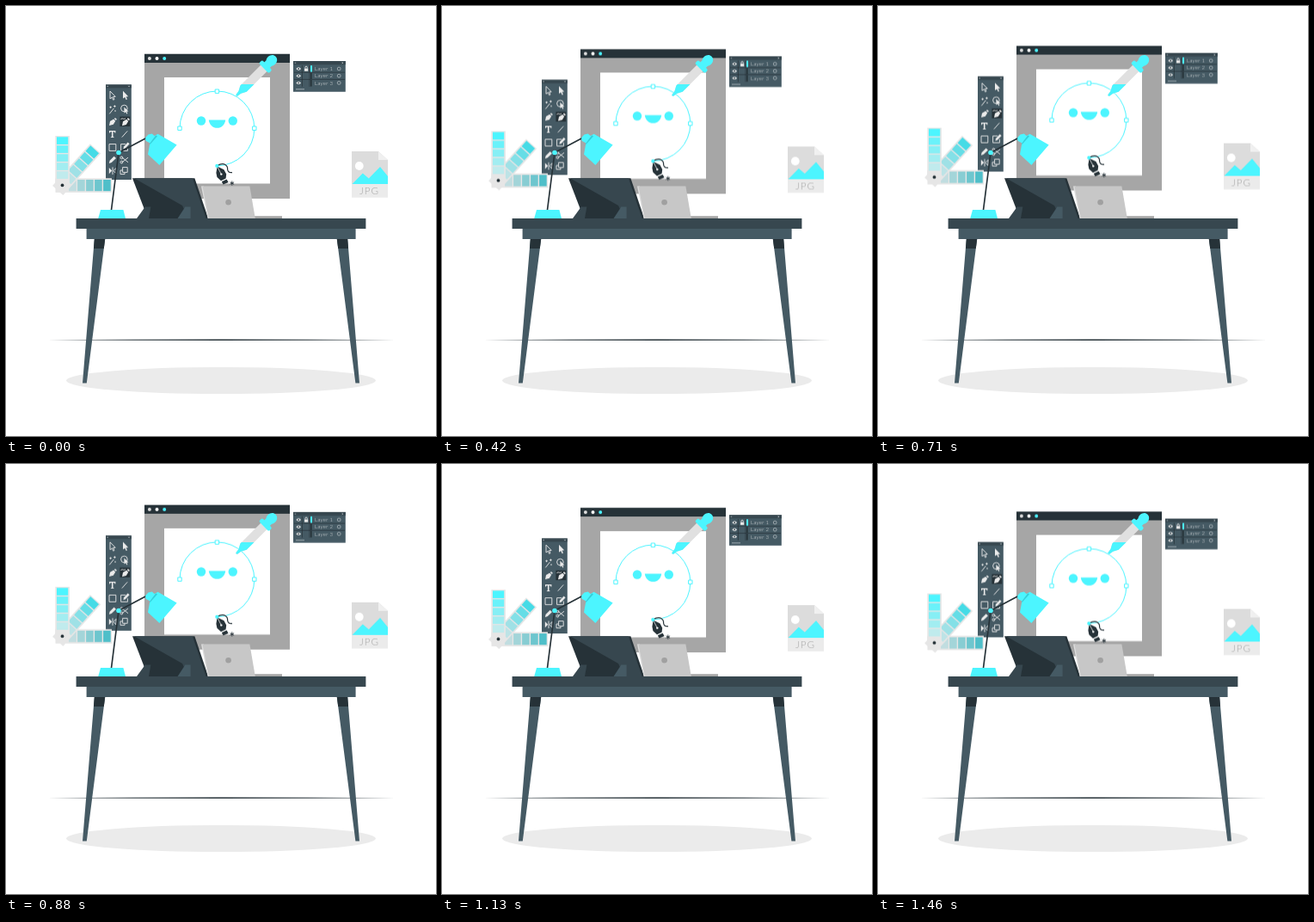
Recreate the animation shown at these times as an HTML page. Size 500 by 500 pixels, loop 1.5 s.

```html
<!DOCTYPE html>
<html lang="en">
<head>
<meta charset="utf-8">
<title>Design desk</title>
<style>
  html, body { margin: 0; width: 100%; height: 100%; overflow: hidden; background: #fff; }
  svg { display: block; width: 100vw; height: 100vh; }
  .float { animation: float 1.5s linear infinite; }
  @keyframes float { 50% { transform: translateY(-10px); } }
  .cyan { fill: #4cf5ff; }
  .night { fill: #263238; }
  .slate { fill: #37474f; }
  .steel { fill: #455a64; }
  .pale { fill: #ebebeb; }
  .line { fill: none; stroke: #ebebeb; stroke-width: .9; }
  text { font-family: Lato, "Open Sans", sans-serif; font-weight: 300; }
</style>
</head>
<body>
<svg viewBox="0 0 500 500">
  <defs>
    <g id="card">
      <rect x="57.3" y="151" width="16.6" height="65.5" fill="#e6e6e6"/>
      <g fill="currentColor">
        <rect x="59" y="152.3" width="13.2" height="8.6"/>
        <rect x="59" y="162.3" width="13.2" height="8.6" opacity=".8"/>
        <rect x="59" y="172.3" width="13.2" height="8.6" opacity=".62"/>
        <rect x="59" y="182.3" width="13.2" height="8.6" opacity=".44"/>
        <rect x="59" y="192.3" width="13.2" height="8.6" opacity=".25"/>
      </g>
    </g>
    <path id="nib" d="M-4 4.5 L-3-.5 1.2-3 3.2-.9 .8 3.2Z M1.8-3.6 3-4.7 4.9-2.8 3.8-1.6Z"/>
    <path id="arrow" d="M0 0 6.2 6.4 3.6 6.6 5 9.6 3.6 10.2 2.3 7.2 0 8.8Z"/>
    <g id="eye">
      <path class="pale" d="M-2.8 0 Q0-3.4 2.8 0 Q0 3.4-2.8 0Z"/>
      <circle class="slate" r=".9"/>
    </g>
    <clipPath id="liquid"><path d="M260 91H300V110H260Z"/></clipPath>
    <path id="tube" transform="translate(267.6 104.6) rotate(45)" d="M-1.2-1 Q0 .8 1.2-1 L2-6 5.2-12 V-47 H-5.2 V-12 L-2-6Z"/>
  </defs>

  <ellipse cx="250" cy="435.5" rx="180" ry="15.6" fill="#ebebeb"/>
  <path class="night" d="M49 388.2 Q250 386.8 452 388.2 Q250 389.6 49 388.2Z"/>

  <g class="float">
    <!-- window -->
    <path fill="#a6a6a6" d="M161 56H330V224H161Z"/>
    <path class="night" d="M161 55.8H330V66H161Z"/>
    <circle cx="166.9" cy="60.9" r="2" fill="#e0e0e0"/>
    <circle cx="175.5" cy="60.9" r="2" fill="#fff"/>
    <circle class="cyan" cx="184.2" cy="60.9" r="2"/>
    <path fill="#fff" d="M184 83H307V206.5H184Z"/>

    <!-- face -->
    <g class="cyan">
      <circle cx="227" cy="133.5" r="5.2"/>
      <circle cx="263.8" cy="133.5" r="5.2"/>
      <path d="M235.8 132.4H255.2C254.6 138 250.4 141.8 245.5 141.8S236.4 138 235.8 132.4Z"/>
    </g>
    <g fill="none" stroke="#4cf5ff">
      <path d="M202 142.2 A43.4 43.4 0 1 1 245.4 185.8"/>
      <g fill="#fff">
        <path d="M243.2 97H247.6V101.4H243.2Z"/>
        <path d="M199.8 140H204.2V144.4H199.8Z"/>
        <path d="M286.6 140H291V144.4H286.6Z"/>
      </g>
    </g>

    <!-- pen cursor -->
    <path fill="none" stroke="#263238" stroke-width="1.2" d="M245.4 185.8C254 180.5 258 186 257.6 190 C258 193 260 194 263 193.6"/>
    <path class="night" d="M245.6 186.5 253.4 190.2 256.2 195.5 255.6 200.6 250 203.2 245.4 199 244.4 194Z M250.8 204.2 256.6 201.4 258.6 205 252.6 207.6Z"/>
    <path stroke="#fff" stroke-width=".7" d="M246.4 188 250 195"/>
    <circle cx="250.3" cy="195.6" r="1.2" fill="#fff"/>
    <circle class="cyan" cx="245.3" cy="185.9" r="2.1"/>
    <path stroke="#263238" stroke-width=".9" d="M262.8 203.5V208.7 M260.5 204.8 265.1 207.4 M260.5 207.4 265.1 204.8"/>

    <!-- layers panel -->
    <path class="steel" d="M334 64H394.8V99.8H334Z"/>
    <path class="slate" d="M334 64H394.8V68.3H334Z"/>
    <path stroke="#c7d0d4" stroke-width=".7" d="M335.6 66.2H337.2 M390.6 65.5 392 66.9 M392 65.5 390.6 66.9 M337 96.8H347"/>
    <path stroke="#263238" stroke-width=".7" d="M335 77.2H394 M335 85.4H394 M344.4 69V93.8 M353 69V93.8"/>
    <path class="cyan" d="M354 69.2H356V76.6H354Z"/>
    <path class="night" d="M354 77.8H355.6V85H354Z M354 86H355.6V93.4H354Z"/>
    <use href="#eye" x="340.2" y="73"/>
    <use href="#eye" x="340.2" y="81.2"/>
    <use href="#eye" x="340.2" y="89.4"/>
    <path class="pale" d="M347 72.6H351.2V75.8H347Z"/>
    <path class="line" stroke-width=".7" d="M347.9 72.6V71.4A1.2 1.2 0 0 1 350.3 71.4V72.6"/>
    <g fill="#ebebeb" font-size="6.1" letter-spacing=".3">
      <text x="359" y="75.2">Layer 1</text>
      <text x="359" y="83.4">Layer 2</text>
      <text x="359" y="91.6">Layer 3</text>
    </g>
    <g fill="none" stroke="#d5dadd" stroke-width=".6">
      <circle cx="387.2" cy="73" r="1.9"/>
      <circle cx="387.2" cy="81.2" r="1.9"/>
      <circle cx="387.2" cy="89.4" r="1.9"/>
    </g>

    <!-- toolbar -->
    <path class="steel" d="M116 91.4H145.8V202H116Z"/>
    <path class="slate" d="M116 91.4H145.8V95.4H116Z"/>
    <path stroke="#c7d0d4" stroke-width=".7" d="M117.4 93.4H119 M142.4 92.8 143.6 94 M143.6 92.8 142.4 94"/>
    <path class="night" d="M132.4 128.6H144.2V140H132.4Z"/>
    <use href="#arrow" class="line" x="121" y="99"/>
    <use href="#arrow" class="pale" x="136" y="98.8"/>
    <path class="line" d="M120.3 125.4 125.4 119 M121.6 116.5V119 M120.4 117.7H122.8 M126.4 115.3V117.9 M125.1 116.6H127.7 M127 121V123"/>
    <circle class="line" cx="137.4" cy="119" r="3.8"/>
    <use href="#arrow" class="pale" transform="translate(137.4 117.4) scale(.8)"/>
    <use href="#nib" class="pale" x="124" y="134.6"/>
    <use href="#nib" class="pale" x="139" y="134.8"/>
    <path class="line" d="M133.6 132C135 129 137 133 139 130.4"/>
    <path class="pale" d="M120 145H127.4V147.4H126.4L126 146.2H124.5V152L125.6 152.4V153H121.8V152.4L122.9 152V146.2H121.4L121 147.4H120Z"/>
    <path class="line" d="M134.8 152.6 141.2 145.4"/>
    <path class="line" d="M120 160.6H127.8V168.4H120Z M139 160.6H133.6V168.4H141.4V164.4"/>
    <path class="pale" d="M136.4 166.2 137 163.4 141.6 158.4 143.6 160.2 139 165.2Z"/>
    <path class="pale" d="M119.8 183 120.6 179.8 125.6 174.8 128 177 122.8 182Z"/>
    <path class="line" d="M134.6 175.8 142 181.8 M134.6 182 142 176.2"/>
    <circle class="line" cx="134.4" cy="176.4" r="1.4"/>
    <circle class="line" cx="134.4" cy="181.6" r="1.4"/>
    <path class="pale" d="M119.8 188V195.2L123.2 191.6Z"/>
    <path class="line" d="M124 187.4V196 M128 188.4V195L125 191.6Z"/>
    <path class="line" d="M135.6 187.6H141.2V193.4H135.6Z M135.4 191H133V195.6H138V193.6"/>

    <!-- swatches -->
    <use href="#card" color="#4fbfc9" transform="rotate(90 65.5 208.5)"/>
    <use href="#card" color="#45dbe6" transform="rotate(42 65.5 208.5)"/>
    <svg x="0" y="0" width="500" height="210" viewBox="0 0 500 210"><use href="#card" color="#4cf5ff"/></svg>
    <circle class="night" cx="65.5" cy="208.4" r="1.9"/>

    <!-- image file -->
    <path fill="#dcdcdc" d="M402 169H433L444 179V207H402Z"/>
    <path fill="#f0f0f0" d="M433 169 444 179H433Z"/>
    <circle cx="410.8" cy="186" r="4.9" fill="#fff"/>
    <path class="cyan" d="M402.6 207 414.8 194.4 421.8 200.4 435 187 444 198V207Z"/>
    <path class="pale" d="M402 207H444V222.8H402Z"/>
    <text x="411" y="219" font-size="11.6" letter-spacing="1" fill="#a6a6a6">JPG</text>
  </g>

  <!-- eyedropper -->
  <use href="#tube" fill="#e0e0e0"/>
  <g clip-path="url(#liquid)"><use href="#tube" class="cyan"/></g>
  <g class="cyan" transform="translate(267.6 104.6) rotate(45)">
    <rect x="-8.2" y="-51" width="16.4" height="5.6" rx="2"/>
    <path d="M-4.6-50V-54C-7.5-58-5.5-65 0-65S7.5-58 4.6-54V-50Z"/>
  </g>

  <!-- tablet -->
  <path class="night" d="M147 200.2H219.4L235.2 247H165Z"/>
  <path class="slate" d="M149 200.2H217L232.6 247H212L205 232Z"/>
  <path class="steel" d="M199.6 247 208.4 233.4H214.6V247Z"/>
  <path class="slate" d="M152 247 161.8 233.4H168.4L166 247Z"/>

  <!-- laptop -->
  <path fill="#a6a6a6" d="M236 244.2H321V247H236Z"/>
  <path fill="#dedede" d="M227 209.4H230L237 247H234.6Z"/>
  <path fill="#c7c7c7" d="M228.4 209.4H283.4L289.8 247H235.8Z"/>
  <circle cx="258.6" cy="228.2" r="3.3" fill="#a0a0a0"/>

  <!-- lamp -->
  <path fill="none" stroke="#263238" stroke-width="1.7" d="M122.4 238 131 170.5 165 152.6"/>
  <circle class="cyan" cx="131" cy="170.5" r="2.8"/>
  <path class="cyan" d="M110 237H136.4L139 247H107.2Z"/>
  <path class="cyan" d="M162 153.2 165.4 149.4 169.8 148.6 172.6 151 176.6 148.8 198.6 161.6 178.4 185 165 172.4 167.4 159.6 162.6 156.8Z"/>
  <path fill="#35cfda" d="M167.4 159.6 174.2 150.2 176 151.6 167 161.6Z"/>

  <!-- desk -->
  <path class="steel" d="M102.8 271H115.2L93.8 438.6H89Z M384.8 271H397.2L411 438.6H406.4Z"/>
  <path class="night" d="M102.8 271H115.2L113.8 282H102Z M384.8 271H397.2L398 282H386.2Z"/>
  <path class="steel" d="M93.6 258.6H406.6V271H93.6Z"/>
  <path class="slate" d="M81.6 247H418.4V259H81.6Z"/>
</svg>
</body>
</html>
```
